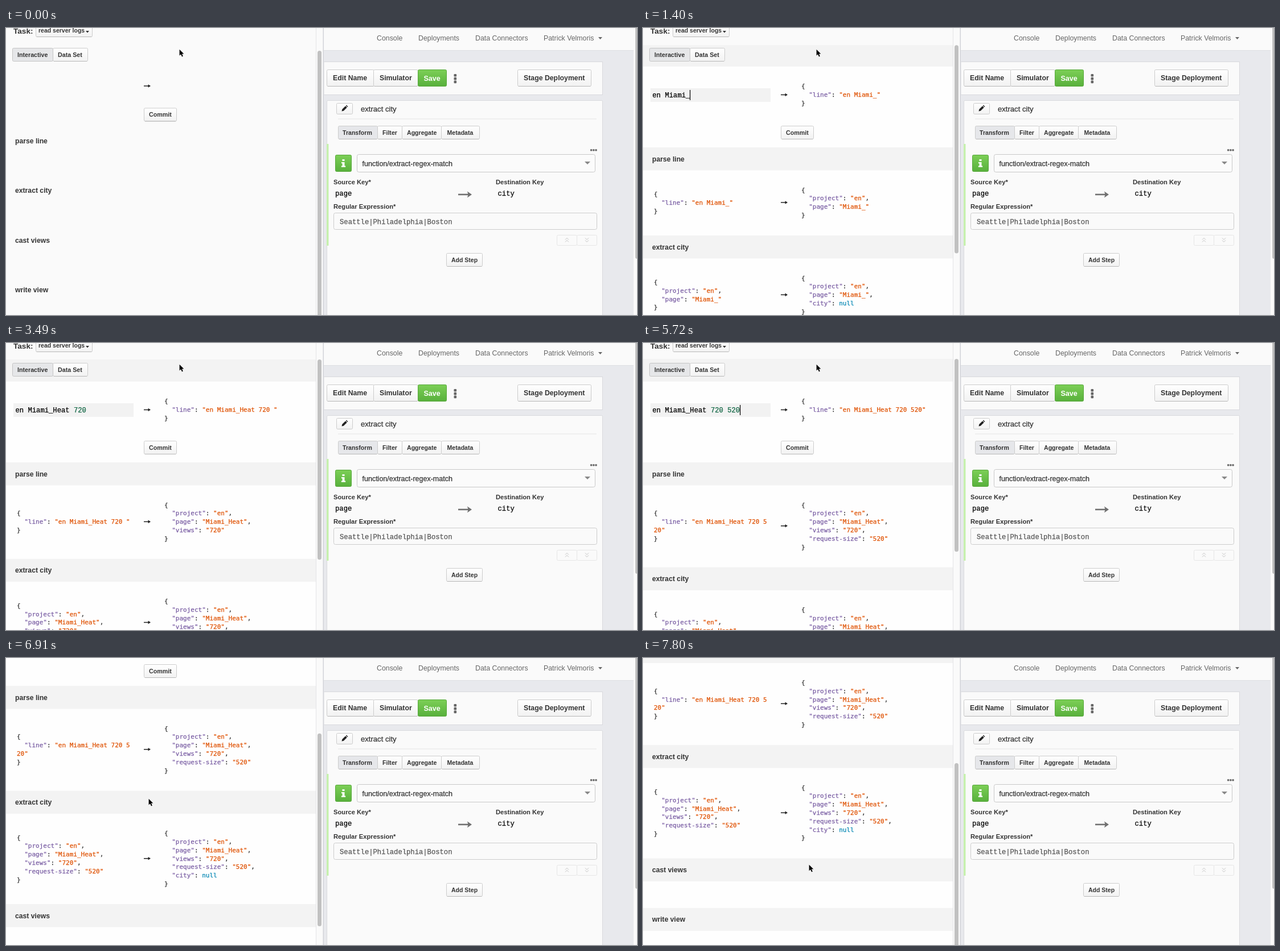
These frames come from a looping animation (1108 px wide and 505 px high, 8000 ms). An HTML page:

```html
<!DOCTYPE html>
<html lang="en">
<head>
<meta charset="utf-8">
<title>Task simulator</title>
<style>
html, body { margin: 0; width: 100%; height: 100%; overflow: hidden; background: #fafafa; }
svg { display: block; }
text { font-family: "Liberation Sans", Arial, sans-serif; color: #333; fill: currentColor; white-space: pre; }
.b { font-weight: bold; }
.code, .mono, .mid { stroke: currentColor; stroke-width: .25; }
.code { font: 11px "DejaVu Sans Mono", Menlo, monospace; }
.mono { font: 12.2px "Liberation Mono", Courier, monospace; color: #000; }
.key { color: #795da3; }
.str { color: #df5000; }
.null { color: #0086b3; }
.num { color: #116644; }
</style>
</head>
<body>
<svg width="1108" height="505" viewBox="0 0 1108 505">
  <defs>
    <linearGradient id="plain" x2="0" y2="1"><stop stop-color="#fff"/><stop offset="1" stop-color="#f2f2f2"/></linearGradient>
    <linearGradient id="green" x2="0" y2="1"><stop stop-color="#7ccf56"/><stop offset="1" stop-color="#58b03c"/></linearGradient>
  </defs>
  <g id="left"></g>
  <g id="right"></g>
  <g id="over"></g>
</svg>
<script>
const LOOP = 8000;
const INPUT = 'en Miami_Heat 720 520';
const CHAR = 7.32, LINE = 14.8, WRAP = 30;

// [time, characters typed]
const TYPING = [[0, 0], [450, 1], [600, 3], [750, 5], [900, 7], [1110, 8], [1400, 9],
  [1700, 11], [1850, 12], [2150, 13], [2300, 14], [2600, 15], [2750, 16], [2900, 17],
  [3040, 18], [3930, 19], [4530, 20], [4680, 21]];
// [time, caret shown]
const CARET = [[0, 0], [450, 1], [3490, 0], [3930, 1], [5130, 0], [5720, 1], [6320, 0], [6770, 1]];
// [time, scroll]
const SCROLL = [[0, 0], [6470, 18], [6620, 68], [6770, 124], [6910, 161], [7060, 178],
  [7200, 185], [7650, 212], [7800, 241.5]];
// [time, pointer x, pointer y]
const POINTER = [[0, 304, 37], [6170, 298, 80], [6320, 275, 165], [6470, 252, 238],
  [6620, 250, 247], [7350, 266, 300], [7500, 285, 354], [7650, 290, 361], [7800, 291, 363]];

const at = (table, t) => table.filter(row => row[0] <= t).pop();

const rect = (x, y, w, h, fill, more = '') =>
  `<rect x="${x}" y="${y}" width="${w}" height="${h}" fill="${fill}" ${more}/>`;
const path = (d, more = '') => `<path d="${d}" ${more}/>`;
const text = (x, y, s, size, cls = '', more = '') =>
  `<text x="${x}" y="${y}" class="${cls}" ${size ? `font-size="${size}"` : ''} ${more}>${s}</text>`;
const bold = (x, y, s, size) => text(x, y, s, size, 'b');
const span = (cls, s) => `<tspan class="${cls}">${s}</tspan>`;

function box(x, y, w, h, fill = 'url(#plain)', stroke = '#ccc', r = 2) {
  return rect(x + .5, y + .5, w - 1, h - 1, fill, `stroke="${stroke}" rx="${r}"`);
}
function button(x, y, w, h, label, tx, size, fill) {
  return box(x, y, w, h, fill) +
    path(`M${x + 2} ${y + h - .5}h${w - 4}`, 'stroke="#b8b8b8"') +
    bold(tx, y + h / 2 + size * .36, label, size);
}
const arrow = y =>
  path(`M242 ${y}h9`, 'stroke="#222" stroke-width="1.5"') +
  path(`M249.5 ${y - 2.8}l4.5 2.8l-4.5 2.8z`, 'fill="#222"');

// Rows of a printed JSON object; a long value breaks at the column limit.
function jsonRows(fields, limit = Infinity) {
  const rows = ['{'];
  fields.forEach(([key, value], i) => {
    const cls = value === null ? 'null' : 'str';
    const shown = value === null ? 'null' : `"${value}"`;
    const room = limit - key.length - 6;
    const comma = i < fields.length - 1 ? ',' : '';
    const rest = shown.slice(room);
    rows.push('  ' + span('key', `"${key}"`) + ': ' + span(cls, shown.slice(0, room)) + comma);
    if (rest && shown.length > room) rows.push(span(cls, rest));
  });
  return [...rows, '}'];
}
const printRows = (rows, x, mid) => rows.map((row, i) =>
  text(x, (mid + (i - (rows.length - 1) / 2) * LINE + 4).toFixed(1), row, 0, 'code')).join('');

function parse(line) {
  const names = ['project', 'page', 'views', 'request-size'];
  return line.split(' ').filter(Boolean).map((word, i) => [names[i], word]);
}

function leftPane(t) {
  const typed = INPUT.slice(0, at(TYPING, t)[1]);
  const scroll = at(SCROLL, t)[1];
  const live = typed.length > 0;
  const parsed = parse(typed);
  const lineField = [['line', typed]];
  const sections = [
    ['parse line', jsonRows(lineField, WRAP), jsonRows(parsed)],
    ['extract city', jsonRows(parsed, WRAP), jsonRows([...parsed, ['city', null]])],
    ['cast views'], ['write view']
  ];
  let y = live ? 230.5 : 199, body = '', bars = '';
  for (const [title, before, after] of sections) {
    bars += rect(0, y - 20.5, 544, 40.5, '#f3f3f3');
    body += bold(16, y + 4, title, 12.2);
    if (live && after) {
      const mid = y + 54 + LINE * (after.length - 1) / 2;
      body += printRows(before, 19, mid) + printRows(after, 278, mid) + arrow(mid + .3);
      y += 95.8 + LINE * after.length;
    } else y += 87.3;
  }
  const total = y - 87.3 + 100, ratio = 521.6 / total;
  const top = 43 * ratio;

  let out = rect(0, 0, 558, 505, '#fafafa');
  let page = '';
  if (live) {
    page += rect(0, 67.6, 544, 900, '#fefefe') + rect(0, top, 544, 67.6 - top, '#f3f3f3') + bars;
    page += rect(13, 106, 211, 24, '#f2f2f2');
    const words = typed.slice(0, 14), digits = typed.slice(14);
    page += text(16.5, 122, words + span('num', digits), 0, 'mono');
    if (at(CARET, t)[1]) page += rect(Math.round(16.5 + typed.length * CHAR), 109, 1.2, 18, '#000');
    page += printRows(jsonRows(lineField), 278, 117);
  }
  page += bold(13, 10, 'Task:', 13.6);
  page += button(52, -7, 100, 23, 'read server logs', 57, 10.5) + path('M140 5h6l-3 3.5z', 'fill="#333"');
  page += button(82, 35, 62, 24, 'Data Set', 91, 10.7) + box(11, 35, 72, 24, '#e6e7e9', '#c4c4c4') +
    bold(20, 51, 'Interactive', 10.7);
  page += arrow(live ? 117.5 : 102) + button(242, live ? 172 : 140.5, 58, 24, 'Commit', 251, 10.7);
  out += `<g transform="translate(0 ${-scroll})">${page}${body}</g>`;
  out += rect(544, 0, 14, 505, '#fafafa') + rect(544, 0, 1, 505, '#e4e4e6');
  out += rect(547, (top + scroll * ratio).toFixed(1), 7, (521.6 * ratio).toFixed(1), '#c1c1c1', 'rx="3.5"');
  return out;
}

function pointer(t) {
  const [time, x, y] = at(POINTER, t);
  const shape = time === 7500
    ? path('M-3 -6q3 0 3 2q0 -2 3 -2M0 -4v9M-3 7q3 0 3 -2q0 2 3 2M-1.5 2.5h3', 'fill="none" stroke="#111" stroke-width="1.2"')
    : path('M.6 .8v10.8l2.5 -2.3l1.9 4.2l1.8 -.8l-1.8 -4.1h3.4z', 'fill="#000" stroke="#fff" paint-order="stroke"');
  return `<g transform="translate(${x} ${y})">${shape}</g>`;
}

function rightPane() {
  let s = rect(557, 0, 551, 505, '#e8e9ed') + rect(557, 0, 546, 39, '#fafafa') +
    rect(557, 39, 546, 1, '#dedfe2') + rect(556.5, 0, 1.5, 505, '#d2d3d8');
  for (const [x, label] of [[651, 'Console'], [724, 'Deployments'], [824, 'Data Connectors'], [944, 'Patrick Velmoris']])
    s += text(x, 22, label, 12.35, '', 'style="color:#666"');
  s += path('M1040 16h7l-3.5 4z', 'fill="#666"');
  s += rect(1102, 0, 6, 505, '#fafafa') + rect(1105, -5, 6, 411, '#c1c1c1', 'rx="3"');

  s += rect(558, 59.5, 489.5, 58, '#fafafa', 'stroke="#d8d9dd"');
  s += button(563, 73, 84, 30, 'Edit Name', 574, 12.3) + button(645, 73, 79, 30, 'Simulator', 656, 12.3);
  s += box(723, 73, 51, 30, 'url(#green)', '#56a83b') +
    text(733.5, 92.5, 'Save', 12.5, 'b', 'style="color:#fff"');
  s += [81, 86.8, 92.6].map(y => rect(786.5, y, 4.6, 4.6, '#666', 'rx="1.2"')).join('');
  s += button(898, 73, 130, 30, 'Stage Deployment', 909, 12.3);

  s += rect(563.5, 127.5, 484, 400, '#fafafa', 'stroke="#d8d9dd" rx="2"');
  s += rect(563, 204, 3.5, 179, '#c6f0ad');
  s += box(580, 132, 29, 20) +
    path('M589.5 146.5l.8 -3.4l5.8 -5.8l2.6 2.6l-5.8 5.8zM596.8 136.6l1 -1l2.6 2.6l-1 1z', 'fill="#222"');
  s += text(623, 146.8, 'extract city', 13.1, 'mid') + rect(583, 159.5, 454, 1, '#e6e6e6');
  const tabs = [[583, 70, 'Transform', 591], [652, 44, 'Filter', 661], [695, 70, 'Aggregate', 704], [764, 68, 'Metadata', 774.5]];
  s += tabs.map(([x, w, label, tx], i) => button(x, 172, w, 24, label, tx, 10.6, i ? undefined : '#e6e7ea')).join('');
  s += [1026, 1030.2, 1034.4].map(x => rect(x, 213.3, 3.3, 3.3, '#666', 'rx=".8"')).join('');

  s += box(578, 223, 29, 30, 'url(#green)', '#56a83b') +
    path('M590.5 231h4v3h-4zM589 236h5.5v6.5h1.7v2.2h-7.4v-2.2h1.8v-4.3h-1.6z', 'fill="#fff"');
  s += box(616, 222, 419, 32, '#fbfbfb', '#c8c8c8', 3) + text(625.5, 242.5, 'function/extract-regex-match', 12.5, 'mid') +
    path('M1016 235h10l-5 5z', 'fill="#888"');
  s += bold(575, 275, 'Source Key*', 11.2) + bold(860, 275, 'Destination Key', 11.2) + bold(575, 317.5, 'Regular Expression*', 11.2);
  s += text(578, 295, 'page', 0, 'mono') + text(863.5, 295, 'city', 0, 'mono');
  s += path('M794 293h19', 'stroke="#707070" stroke-width="2.6"') +
    path('M810 287.5l8 5.5l-8 5.5l1.6 -5.5z', 'fill="#707070"');
  s += box(575, 325, 463, 30, '#fafafa', '#ccc', 3) +
    text(586, 345, 'Seattle|Philadelphia|Boston', 0, 'mono', 'style="color:#555"');
  s += box(967, 364, 36, 19, '#fafafa', '#e6e6e6') + box(1002, 364, 36, 19, '#fafafa', '#e6e6e6');
  s += path('M982 372.5l3 -3l3 3m-6 4l3 -3l3 3M1017 369.5l3 3l3 -3m-6 4l3 3l3 -3', 'fill="none" stroke="#c4c4c4"');
  return s + button(773, 396, 64, 24, 'Add Step', 782, 10.5);
}

const [left, right, over] = ['left', 'right', 'over'].map(id => document.getElementById(id));
right.innerHTML = rightPane();

function set(node, markup) {
  if (node.markup !== markup) node.innerHTML = node.markup = markup;
}
function draw(now) {
  const t = now % LOOP;
  set(left, leftPane(t));
  set(over, pointer(t));
}
const start = performance.now();
function tick() {
  draw(performance.now() - start);
  requestAnimationFrame(tick);
}
tick();
</script>
</body>
</html>
```
